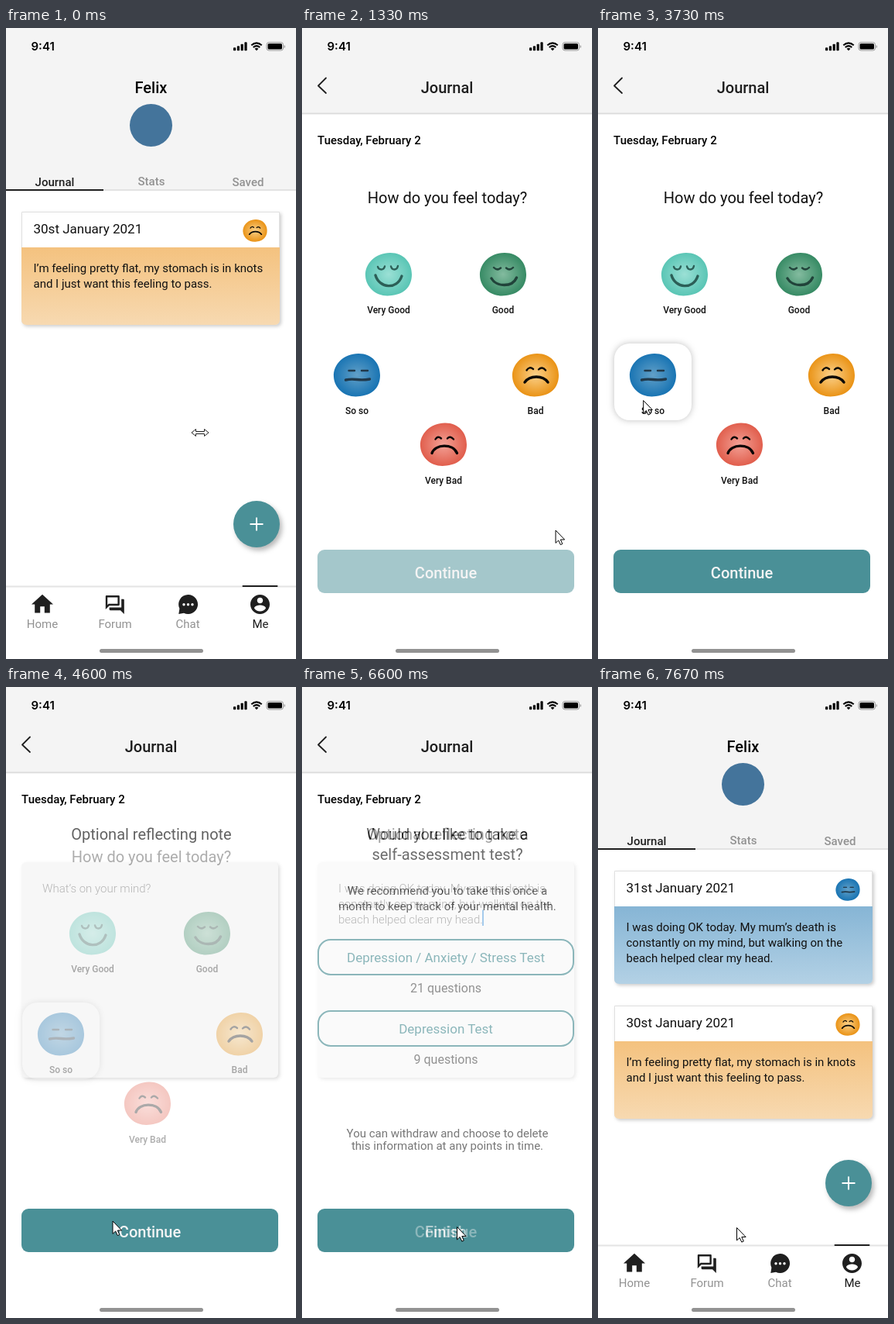
Recreate the animation shown at these times as an HTML page. Size 375 by 814 pixels, loop 8000 ms.

```html
<!DOCTYPE html>
<html lang="en">
<head>
<meta charset="utf-8">
<title>Mood journal</title>
<style>
html, body { margin: 0; width: 375px; height: 814px; overflow: hidden; background: #fff; }
svg { display: block; font-family: Roboto, sans-serif; }
.soft { filter: drop-shadow(2px 2px 2px rgba(0,0,0,.2)); }
.lift { filter: drop-shadow(3px 4px 3px rgba(0,0,0,.28)); }
.glow { filter: drop-shadow(0 0 4px rgba(0,0,0,.25)); }
</style>
</head>
<body>
<svg id="stage" width="375" height="814" viewBox="0 0 375 814"></svg>
<script>
const TEAL = '#4a9097', INK = '#1f1f1f', GREY = '#929292', PALE = '#f4f4f4';

const rect = (x, y, w, h, fill, more = '') =>
  `<rect x="${x}" y="${y}" width="${w}" height="${h}" fill="${fill}" ${more}/>`;
const path = (d, more = '') => `<path d="${d}" ${more}/>`;
const line = (d, color, width, more = '') =>
  path(d, `fill="none" stroke="${color}" stroke-width="${width}" stroke-linecap="round" stroke-linejoin="round" ${more}`);
const text = (x, y, size, str, color = '#111', weight = 400, anchor = 'start') =>
  `<text x="${x}" y="${y}" font-size="${size}" fill="${color}" font-weight="${weight}" text-anchor="${anchor}">${str}</text>`;
const mid = (x, y, size, str, color, weight) => text(x, y, size, str, color, weight, 'middle');
const at = (x, y, inner, scale = 1) => `<g transform="translate(${x} ${y}) scale(${scale})">${inner}</g>`;
const layer = (id, inner) => `<g id="${id}">${inner}</g>`;
const page = (id, inner) => layer(id, rect(0, 0, 375, 814, '#fff') + inner);

// Faces: centre colour, edge colour, line colour, eyes, mouth
const faces = {
  veryGood: ['#9be0d5', '#54c3b2', '#2c5f57',
    'M-14 -10Q-13 -6.5 -9.5 -6.5T-5 -10.5M3 -10.5Q4 -6.5 7.5 -6.5T12 -11', 'M-17 1C-12 18 11 20 17 2'],
  good: ['#83bb9f', '#30865f', '#21433a',
    'M-12 -9Q-7.5 -4.5 -3 -8.5M4 -8.5Q8.5 -4.5 13 -9', 'M-15 5C-9 16 12 17 17.5 4'],
  soso: ['#62a0c8', '#1270b1', '#20394b',
    'M-10.5 -6H-3M6 -6H14', 'M-14.5 6Q-8 4.5 0 5.5T16.5 5'],
  bad: ['#fbd18a', '#e88d0b', '#0c0a06',
    'M-11.5 -6.5Q-8 -12 -3 -8M4 -7.5Q8.5 -12 13 -6.5', 'M-14 9Q-9 2 1 2T16 9'],
  veryBad: ['#f3a196', '#df5846', '#0c0606',
    'M-10.5 -7Q-7.5 -12 -3 -8M5 -8Q8.5 -12 13 -7', 'M-15 11C-11 -1 12 -2 17.5 11']
};
const blob = 'M-30 2C-31 -14 -17 -28 2 -28C20 -28 30 -15 30 0C30 14 22 25 4 27C-14 30 -29 18 -30 2Z';
const face = (name, x, y, scale) => {
  const [, , ink, eyes, mouth] = faces[name];
  return at(x, y, path(blob, `fill="url(#${name})"`) + line(eyes, ink, 2.4) + line(mouth, ink, 3.4), scale);
};
const mood = (name, x, y, label) => face(name, x, y) + mid(x, y + 50, 12, label, '#111', 500);

const defs = `<defs>${Object.entries(faces).map(([name, [core, edge]]) =>
  `<radialGradient id="${name}" r=".55"><stop stop-color="${core}"/><stop offset="1" stop-color="${edge}"/></radialGradient>`).join('')}
  ${[['amber', '#f4c27f', '#f7d9b1'], ['sky', '#86b5d5', '#b3d1e5']].map(([id, a, b]) =>
  `<linearGradient id="${id}" x2="0" y2="1"><stop stop-color="${a}"/><stop offset="1" stop-color="${b}"/></linearGradient>`).join('')}</defs>`;

const card = (x, y, date, lines, fill, mark) => at(x, y,
  `<g class="soft">${path('M0 0H333V139Q333 145 327 145H6Q0 145 0 139Z', 'fill="#fff" stroke="#e0e0e0"')}
  ${path('M-.5 45.5H333.5V139Q333.5 145.5 327 145.5H6Q-.5 145.5 -.5 139Z', `fill="url(#${fill})"`)}</g>` +
  text(15, 27.5, 17, date) + face(mark, 301.5, 24, .52) +
  lines.map((s, i) => text(15, 77.5 + 20 * i, 15, s)).join(''));

const oldCard = (x, y) => card(x, y, '30st January 2021',
  ['I’m feeling pretty flat, my stomach is in knots', 'and I just want this feeling to pass.'], 'amber', 'bad');
const note = ['I was doing OK today. My mum’s death is', 'constantly on my mind, but walking on the', 'beach helped clear my head.'];

const icons =
  at(30.2, 726.6, path('M10 20v-6h4v6h5v-8h3L12 3 2 12h3v8z'), 1.4) +
  at(126.4, 729.6, path('M15 4v7H5.17L4 12.17V4h11m1-2H3c-.55 0-1 .45-1 1v14l4-4h10c.55 0 1-.45 1-1V3c0-.55-.45-1-1-1zm5 4h-2v9H6v2c0 .55.45 1 1 1h11l4 4V7c0-.55-.45-1-1-1z'), 1.2) +
  path('M235.5 731a12.5 12.5 0 1 1 -5.5 23.7L223.3 756 224.4 749A12.5 12.5 0 0 1 235.5 731Z') +
  [230, 235.5, 241].map(x => `<circle cx="${x}" cy="743.7" r="1.7" fill="#fff"/>`).join('') +
  at(313.5, 728.4, path('M12 2C6.48 2 2 6.48 2 12s4.48 10 10 10 10-4.48 10-10S17.52 2 12 2zm0 3c1.66 0 3 1.34 3 3s-1.34 3-3 3-3-1.34-3-3 1.34-3 3-3zm0 14.2c-2.5 0-4.71-1.28-6-3.22.03-1.99 4-3.08 6-3.08 1.99 0 5.97 1.09 6 3.08-1.29 1.94-3.5 3.22-6 3.22z'), 1.25);

const home = (id, cards) => page(id,
  rect(0, 0, 375, 208, PALE) + mid(187.5, 84, 20, 'Felix', '#000', 500) +
  '<circle cx="187.5" cy="125.5" r="27.5" fill="#44749b"/>' +
  mid(63, 204, 15, 'Journal', INK, 500) + mid(188, 203, 15, 'Stats', GREY, 500) + mid(313, 204, 15, 'Saved', GREY, 500) +
  rect(0, 208, 375, 2, '#e2e2e2') + rect(0, 208, 126, 2, INK) + cards +
  `<circle class="lift" cx="324" cy="640" r="30" fill="${TEAL}"/>` +
  path('M315.5 640H332.5M324 631.5V648.5', 'stroke="#fff" stroke-width="2"') +
  rect(0, 719.5, 375, 2, '#e4e4e4') + rect(305.5, 719, 46, 2, INK, 'rx="1"') +
  `<g fill="${INK}">${icons}</g>` +
  mid(47, 774, 15, 'Home', GREY) + mid(141, 774, 15, 'Forum', GREY) +
  mid(235, 774, 15, 'Chat', GREY) + mid(329, 774, 15, 'Me', INK));

const button = (label, fill = TEAL) =>
  rect(20, 673, 332, 56, fill, 'rx="9"') + mid(186, 710, 20, label, PALE, 500);
const entry = (id, inner) => page(id,
  rect(0, 0, 375, 110, PALE) + rect(0, 109.5, 375, 1.5, '#dcdcdc') + rect(0, 111, 375, 1, '#f4f4f4') +
  line('M31 64.5L21 74.5 31 84', INK, 1.8) + mid(187.5, 84, 20, 'Journal', INK, 500) +
  text(20, 150, 15, 'Tuesday, February 2', '#000', 500) + inner);

const moods = (id, picked) => entry(id,
  mid(188, 226, 20, 'How do you feel today?') +
  (picked ? rect(21, 407, 100, 99, '#fff', 'rx="20" class="glow"') : '') +
  mood('veryGood', 112, 318, 'Very Good') + mood('good', 260, 318, 'Good') +
  mood('soso', 71, 448, 'So so') + mood('bad', 302, 448, 'Bad') + mood('veryBad', 183, 537.5, 'Very Bad') +
  button('Continue', picked ? TEAL : '#a4c7cb'));

const caret = (x, y) => rect(x, y, 2, 20.5, '#1576cf');
const writing = (id, inner) => entry(id,
  mid(188, 197, 20, 'Optional reflecting note') +
  rect(20, 226, 332, 278, PALE, 'rx="6" class="soft"') + inner + button('Continue'));
const hint = text(47, 265, 15, 'What’s on your mind?', '#8f8f8f', 300);

const test = (y, label, count) =>
  rect(21, y, 330, 45, '#fff', `rx="16" stroke="${TEAL}" stroke-width="2"`) +
  mid(186, y + 29, 17, label, TEAL) + mid(186, y + 68, 16, count, '#555');

const status =
  text(32.5, 29, 15, '9:41', '#000', 600).replace('<text', '<text font-family="Inter, sans-serif"') +
  [4, 6, 8.5, 11].map((h, i) => rect(294 + 4.8 * i, 29.3 - h, 3.2, h, '#000', 'rx=".8"')).join('') +
  path('M317.3 22.3Q324 16.6 330.7 22.3M319.7 25Q324 21.4 328.3 25', 'fill="none" stroke="#000" stroke-width="2.1"') +
  path('M321.6 26.7Q324 24.9 326.4 26.7L324 29.3Z') +
  rect(337, 18.5, 21.5, 10.5, 'none', 'rx="3" stroke="#999"') + rect(338.5, 20, 18.5, 7.5, '#000', 'rx="1.6"') +
  path('M359.7 22v4q1.3 -.6 1.3 -2t-1.3 -2', 'fill="#999"') +
  rect(121, 801, 134, 5, '#929292', 'rx="2.5"');

document.getElementById('stage').innerHTML = defs +
  home('start', oldCard(20.5, 237.5)) +
  moods('ask', false) + moods('picked', true) +
  writing('blank', hint) + writing('focus', hint + caret(45, 246.5)) +
  writing('filled', note.map((s, i) => text(47, 265 + 20 * i, 15, s, '#444', 300)).join('') + caret(233, 287.5)) +
  entry('tests',
    mid(188, 197, 20, 'Would you like to take a') + mid(188, 223, 20, 'self-assessment test?') +
    mid(188, 268, 15, 'We recommend you to take this once a') + mid(188, 288, 15, 'month to keep track of your mental health.') +
    test(326, 'Depression / Anxiety / Stress Test', '21 questions') + test(418, 'Depression Test', '9 questions') +
    mid(188, 581, 15, 'You can withdraw and choose to delete', '#222') +
    mid(188, 597, 15, 'this information at any points in time.', '#222') + button('Finish')) +
  home('done', card(21.5, 237.5, '31st January 2021', note, 'sky', 'soso') + oldCard(21.5, 411.5)) +
  status +
  layer('arrow', path('M0 0V16.4L3.7 13 6.3 18.6 8.8 17.5 6.3 12H11.6Z', 'fill="#fff" stroke="#000"')) +
  layer('resize', path('M-11 0L-5.5 -4.5V-1.5H5.5V-4.5L11 0 5.5 4.5V1.5H-5.5V4.5Z', 'fill="#fff" stroke="#222"'));

// Each page dissolves in over the previous one: id, from, to (ms)
const fades = [['ask', 1205, 1330], ['picked', 3140, 3330], ['blank', 4470, 4670], ['focus', 5595, 5600],
  ['filled', 5600, 5730], ['tests', 6430, 6710], ['done', 7470, 7670]];

// Pointer tip: time, x, y
const route = [[0, 251, 522], [610, 251, 522], [1130, 328, 648], [1670, 328, 648], [1930, 274, 621.5], [2140, 274, 621.5],
  [2800, 50, 482], [3000, 57, 464], [3670, 57, 464], [3730, 58.5, 480], [4130, 138, 689], [5010, 138, 689],
  [5110, 134, 620], [5320, 153, 320], [5400, 146.5, 283.5], [5810, 146.5, 283.5], [6270, 201, 694], [6410, 201, 694],
  [6530, 200.5, 696.5], [6700, 200.5, 696.5], [7270, 174.5, 695.5], [7330, 179.5, 695.5], [7470, 179.5, 695.5],
  [7600, 179.5, 697.5], [8000, 179.5, 697.5]];

const el = id => document.getElementById(id);
const ramp = (t, a, b) => Math.min(1, Math.max(0, (t - a) / (b - a)));

function draw(now) {
  const t = now % 8000;
  for (const [id, a, b] of fades) {
    const p = ramp(t, a, b);
    el(id).style.display = p ? '' : 'none';
    el(id).style.opacity = p;
  }
  const i = route.findIndex(k => k[0] > t);
  const [a, x, y] = route[i - 1], [b, x2, y2] = route[i], p = ramp(t, a, b);
  const place = `translate(${x + (x2 - x) * p} ${y + (y2 - y) * p})`;
  const moving = t >= 640;
  for (const id of ['arrow', 'resize']) {
    el(id).setAttribute('transform', place);
    el(id).style.display = (id === 'arrow') === moving ? '' : 'none';
  }
  requestAnimationFrame(() => draw(performance.now()));
}
draw(performance.now());
</script>
</body>
</html>
```
